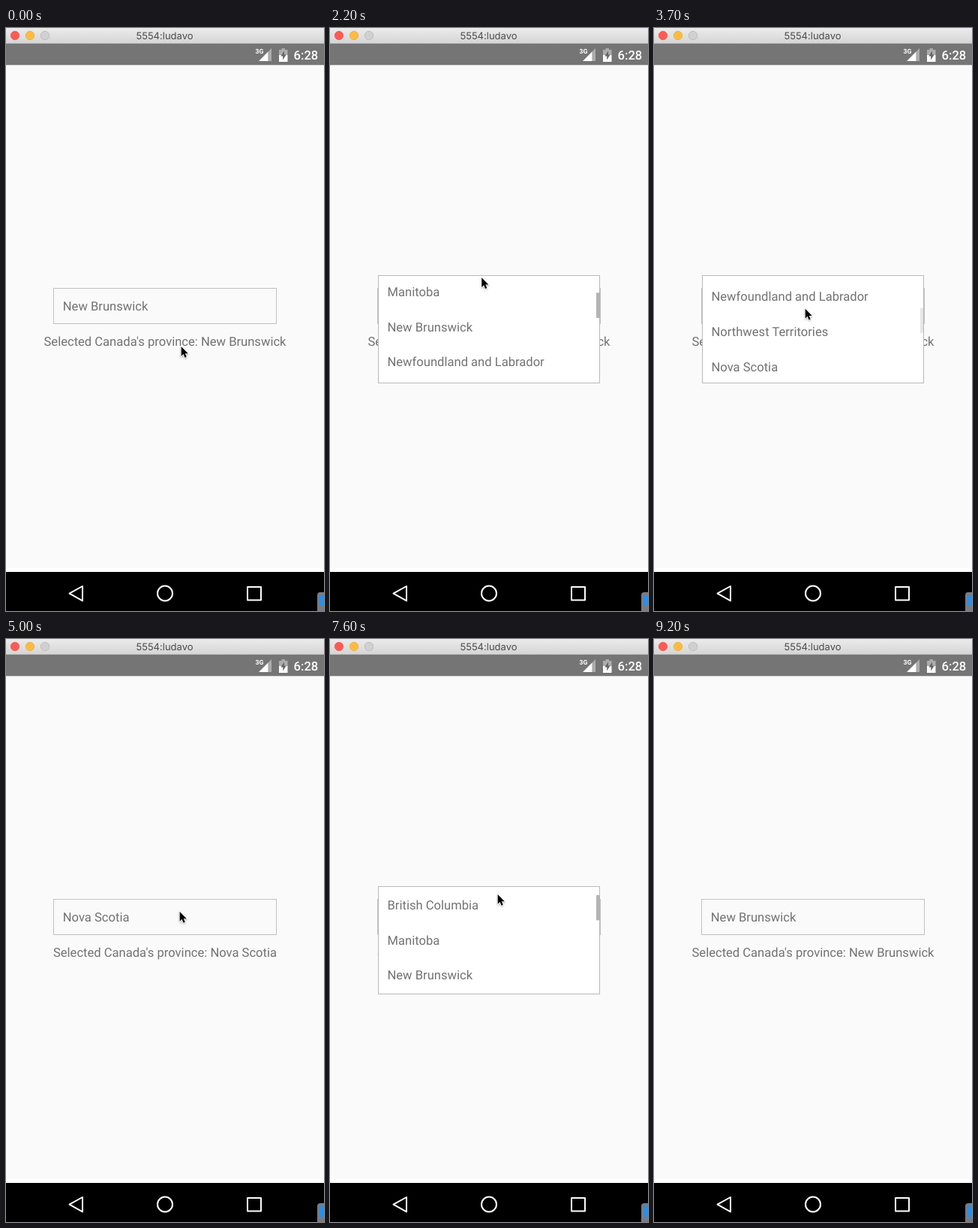
These frames come from a looping animation (424 by 776 pixels, 9500 ms). An HTML page:

```html
<!DOCTYPE html>
<html lang="en">
<head>
<meta charset="utf-8">
<title>Province picker</title>
<style>
  html, body { margin: 0; width: 100%; height: 100%; overflow: hidden; background: #fafafa; }
  svg { display: block; }
  text { white-space: pre; text-rendering: geometricPrecision; }
  .app { font: 16.58px Roboto, sans-serif; fill: #727272; }
  .title { font: 13px Inter, sans-serif; fill: #4b4b4b; }
  .clock { font: 500 16.6px Roboto, sans-serif; fill: #fff; }
  .net { font: 700 8.6px Roboto, sans-serif; fill: #fff; }
  .nav { fill: none; stroke: #fff; stroke-width: 2; stroke-linejoin: round; }
</style>
</head>
<body>
<svg width="424" height="776" viewBox="0 0 424 776">
  <defs>
    <linearGradient id="chrome" x2="0" y2="1">
      <stop offset="0" stop-color="#ebebeb"/>
      <stop offset="1" stop-color="#d4d4d4"/>
    </linearGradient>
    <clipPath id="window"><rect x="65" y="330" width="295" height="142"/></clipPath>
    <filter id="soft" x="-50%" y="-50%" width="200%" height="200%">
      <feDropShadow dx="0" dy="1" stdDeviation="0.9" flood-opacity=".4"/>
    </filter>
  </defs>

  <rect width="424" height="776" fill="#fafafa"/>

  <!-- window bar -->
  <rect width="424" height="21" fill="url(#chrome)"/>
  <rect y="20" width="424" height="1" fill="#b4b4b4"/>
  <circle cx="12" cy="10" r="5.7" fill="#fc5b54" stroke="#e2463f" stroke-width=".6"/>
  <circle cx="32" cy="10" r="5.7" fill="#fdbc40" stroke="#dfa034" stroke-width=".6"/>
  <circle cx="52" cy="10" r="5.7" fill="#d0d0d0" stroke="#b6b6b6" stroke-width=".8"/>
  <text class="title" x="211.5" y="15" text-anchor="middle">5554:ludavo</text>

  <!-- status bar -->
  <rect y="21" width="424" height="28.3" fill="#757575"/>
  <text class="net" x="332.6" y="34">3G</text>
  <path d="M337 44L349.5 31.5V44Z" fill="#fff"/>
  <path d="M349.5 31.5L354 27V44H349.5Z" fill="#fff" opacity=".4"/>
  <path d="M364 29H367.5V27H372V29H375.5V36H364Z" fill="#fff" opacity=".4"/>
  <path d="M364 36H375.5V45H364Z" fill="#fff"/>
  <path d="M371 30.5L366.3 37.5H369.2V42.5L373.6 35.5H371Z" fill="#666"/>
  <text class="clock" x="383.6" y="41.7">6:28</text>

  <!-- form -->
  <rect x="63.5" y="346.5" width="297" height="47" fill="none" stroke="#c0c0c0"/>
  <text class="app" id="value" x="75.8" y="376.3"></text>
  <text class="app" id="summary" x="212" y="423.3" text-anchor="middle"></text>

  <g id="menu">
    <rect x="64.5" y="329.5" width="295" height="143" fill="#fff" stroke="#bababa"/>
    <g clip-path="url(#window)">
      <g class="app" id="rows"></g>
    </g>
    <rect id="thumb" x="355" y="330" width="5" height="33.6" fill="#b4b4b4"/>
  </g>

  <!-- navigation bar -->
  <rect y="719" width="424" height="5" fill="#fff"/>
  <rect y="724" width="424" height="52" fill="#000"/>
  <path class="nav" d="M84.5 752.7L102 743V762.4Z"/>
  <circle class="nav" cx="212" cy="752.5" r="10"/>
  <rect class="nav" x="322" y="744" width="18" height="17.5"/>
  <rect x="415" y="751" width="20" height="40" rx="4" fill="#777c84"/>
  <rect x="418" y="755" width="6" height="14" fill="#2a8fe8"/>

  <g id="cursor" filter="url(#soft)">
    <path d="M0 0V14.6L3.3 11.5L5.5 16.8L8 15.7L5.8 10.5H10.3Z" transform="translate(.7 .9) scale(.88)"
      fill="#000" stroke="#fff" stroke-width="1.4" paint-order="stroke"/>
  </g>
</svg>

<script>
const LOOP = 9500, STEP = 100, PITCH = 46.6, THUMB_RATIO = 0.233;
const provinces = ['Alberta', 'British Columbia', 'Manitoba', 'New Brunswick',
  'Newfoundland and Labrador', 'Northwest Territories', 'Nova Scotia', 'Nunavut', 'Ontario',
  'Prince Edward Island', 'Quebec', 'Saskatchewan', 'Yukon'];

// The pointer rests between glides.
const home = { x: 233, y: 423 };
const glides = [
  { from: 0, to: 100, x: 232, y: 428 },
  { from: 200, to: 500, x: 231, y: 362 },    // to the field
  { from: 1100, to: 1400, x: 198, y: 406 },
  { from: 1500, to: 1600, x: 198, y: 320 },  // first drag
  { from: 1600, to: 1800, x: 198, y: 288 },
  { from: 2000, to: 2500, x: 208, y: 411 },
  { from: 2600, to: 3400, x: 208, y: 343 },  // second drag
  { from: 3500, to: 4100, x: 181, y: 458 },  // pick
  { from: 4700, to: 5000, x: 231, y: 362 },
  { from: 5500, to: 5700, x: 260, y: 243 },  // dismiss
  { from: 6100, to: 6500, x: 238, y: 346 },
  { from: 7000, to: 7300, x: 223, y: 419 },
  { from: 7400, to: 7600, x: 223, y: 339 },  // third drag
  { from: 7900, to: 8400, x: 189, y: 434 },  // pick
  { from: 8900, to: 9200, x: 208, y: -40 }
];

const $ = id => document.getElementById(id);
const within = (t, from, to) => t >= from && t < to;
const ramp = (t, from, to) => Math.min(1, Math.max(0, (t - from) / (to - from)));
const smooth = p => p * p * (3 - 2 * p);
const easeIn = p => p * p;
const easeOut = p => p * (2 - p);

function pointerAt(t) {
  let { x, y } = home;
  for (const g of glides) {
    const p = smooth(ramp(t, g.from, g.to));
    x += (g.x - x) * p;
    y += (g.y - y) * p;
  }
  return `translate(${x} ${y})`;
}

// Each opening of the list starts again at the top.
function offsetAt(t) {
  return t < 4400
    ? 96 * easeOut(ramp(t, 1600, 2200)) + 87 * easeIn(ramp(t, 2600, 3400))
    : 46.4 * ramp(t, 7400, 7600);
}

const thumbAlpha = t => 1 - (t < 4400 ? ramp(t, 3500, 3800) : ramp(t, 7900, 8200));

provinces.forEach((name, i) => {
  const row = document.createElementNS('http://www.w3.org/2000/svg', 'text');
  row.setAttribute('x', 76.5);
  row.setAttribute('y', 360 + i * PITCH);
  row.textContent = name;
  $('rows').append(row);
});

function draw(t) {
  const choice = provinces[within(t, 4400, 8600) ? 6 : 3];
  const open = within(t, 900, 4400) || within(t, 5300, 6000) || within(t, 6800, 8600);
  const offset = offsetAt(t);
  $('value').textContent = choice;
  $('summary').textContent = "Selected Canada's province: " + choice;
  $('menu').setAttribute('visibility', open ? 'visible' : 'hidden');
  $('rows').setAttribute('transform', `translate(0 ${-offset})`);
  $('thumb').setAttribute('y', 330 + offset * THUMB_RATIO);
  $('thumb').setAttribute('opacity', thumbAlpha(t));
  $('cursor').setAttribute('transform', pointerAt(t));
}

function tick() {
  draw(Math.floor(performance.now() % LOOP / STEP) * STEP);
  requestAnimationFrame(tick);
}
tick();
</script>
</body>
</html>
```
